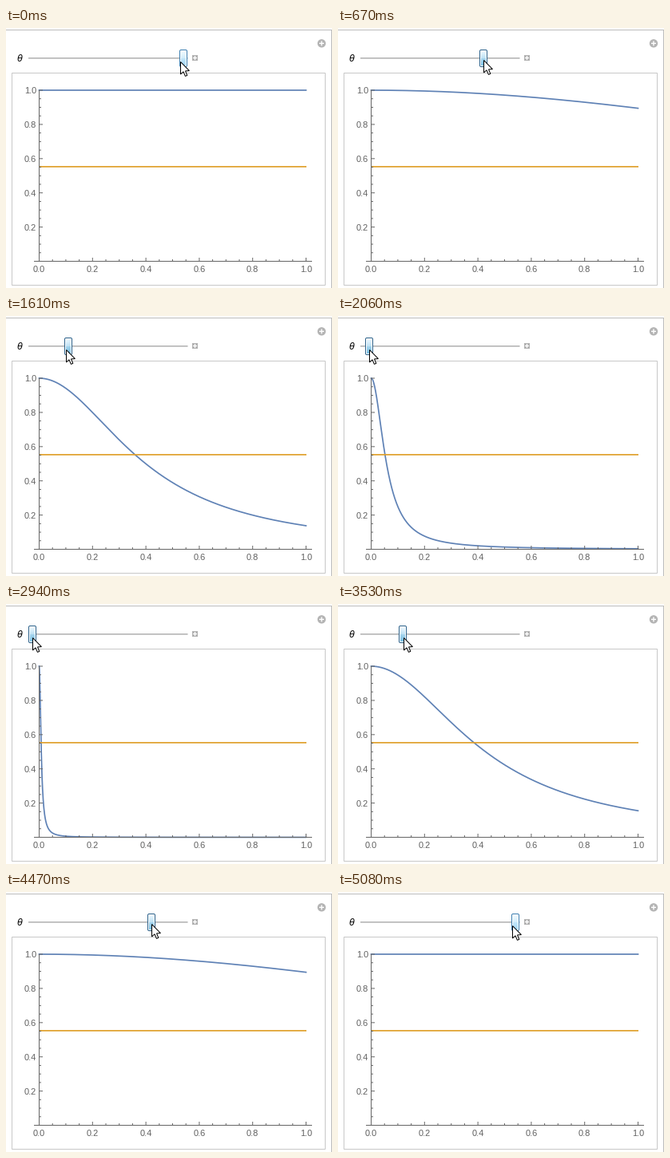
Recreate the animation shown at these times as a matplotlib script. Size 408 by 326 pixels, loop 5.14 s.

```python
import numpy as np
import matplotlib.pyplot as plt
from matplotlib.animation import FuncAnimation
from matplotlib.patches import Circle, FancyBboxPatch, Polygon, Rectangle

plt.rcParams["path.snap"] = False

W, H, DPI = 408, 326, 64
PX = 72 / DPI                     # points per pixel
LOOP, STEP = 5140, 20             # milliseconds
POSE_TIME = LOOP / 70
PRESS, REST, RELEASE = 6, 30, 34  # poses where the drag changes state
BLUE, GOLD, AXIS = "#5e81b5", "#e0a02a", "#666666"
GOLD_LEVEL = 0.553
LEFT, RIGHT = 33, 222             # range of the slider thumb
THETA_MIN, THETA_MAX = 0.008, np.pi / 2

# Key points of the drag: (pose, thumb x) and (pose, pointer x, pointer y).
THUMB = np.array([(5, RIGHT), (15, 122), (21, 81), (22, 78), (29, LEFT)]).T
POINTER = np.array([(0, 218, 42), (2, 222, 38), (5, 222, 38), (15, 122, 42),
                    (22, 75, 42), (29, 33, 42), (30, 30, 42)]).T

fig = plt.figure(figsize=(W / DPI, H / DPI), dpi=DPI, facecolor="white")
ax = fig.add_axes([0, 0, 1, 1])


def px(x):
    return 41.5 + 334 * x


def py(y):
    return 292.5 - 214.5 * y


def line(x0, y0, x1, y1, color, width=1, z=1):
    ax.plot([x0, x1], [y0, y1], color=color, lw=width * PX, zorder=z,
            solid_capstyle="butt")


def label(x, y, text, ha="center", size=11, color="#606060", **style):
    ax.text(x, y, text, ha=ha, va="center_baseline", fontsize=size * PX,
            family="Liberation Sans", color=color, **style)


def plus(x, y, arm):
    line(x - arm, y, x + arm, y, "white", 1.4, 3)
    line(x, y - arm, x, y + arm, "white", 1.4, 3)


def draw_panel():
    line(0, 2.5, W, 2.5, "#bcbcbc")
    line(407.5, 2, 407.5, H, "#bcbcbc")
    ax.add_patch(Rectangle((7.5, 56.5), 392, 266, fill=False,
                           ec="#c8c8c8", lw=PX))
    ax.add_patch(Circle((395, 19.3), 5.2, fc="#b4b4b4", lw=0, zorder=2))
    plus(395, 19.3, 3)
    ax.add_patch(Rectangle((233, 34), 7, 7, fc="#b0b0b0", lw=0, zorder=2))
    plus(236.5, 37.5, 2.5)
    label(16.8, 37.8, "θ", size=12.3, style="italic", color="black")
    line(28, 37.8, 227.5, 37.8, "#b4b4b4", 1.6)


def draw_axes():
    line(35, 292.5, 383, 292.5, AXIS, z=4)
    line(41.5, 78, 41.5, 293, AXIS, z=4)
    for i in range(21):
        v, size = i / 20, 4.5 if i % 4 == 0 else 2.5
        line(px(v), 292.5, px(v), 292.5 - size, AXIS, z=4)
        line(41.5, py(v), 41.5 + size, py(v), AXIS, z=4)
        if i % 4 == 0:
            label(px(v), 301.5, f"{v:.1f}")
            if i:
                label(38, py(v), f"{v:.1f}", ha="right")


def gradient(top, bottom):
    """Glossy vertical ramp with a jump in the middle."""
    mix = np.linspace(0, 0.8, 18)[:, None, None]
    mix[9:] += 0.2
    return (1 - mix) * np.array(top) + mix * np.array(bottom)


HOT = gradient((0.94, 0.98, 1.0), (0.65, 0.85, 0.96))
PRESSED = gradient((0.92, 0.97, 1.0), (0.48, 0.75, 0.89))
ARROW = np.array([(0.5, 0.5), (0.5, 16), (4, 12.8), (6.4, 18.4), (8.8, 17.4),
                  (6.5, 11.9), (11.4, 11.6)])

draw_panel()
draw_axes()
xs = np.linspace(0, 1, 400) ** 2
curve, = ax.plot([], [], color=BLUE, lw=1.7 * PX, zorder=2)
line(px(0), py(GOLD_LEVEL), px(1) + 0.5, py(GOLD_LEVEL), GOLD, 1.7, 3)
thumb_box = FancyBboxPatch((0, 27.5), 9, 21, fc="white", lw=PX, zorder=5,
                           boxstyle="round,pad=0,rounding_size=1.5")
thumb_fill = ax.imshow(HOT, interpolation="nearest", aspect="auto", zorder=6)
cursor = Polygon(ARROW, fc="white", ec="black", lw=PX, zorder=7,
                 joinstyle="miter")
ax.add_patch(thumb_box)
ax.add_patch(cursor)
ax.set(xlim=(0, W), ylim=(H, 0))
ax.axis("off")


def update(n):
    t = n * STEP + 16
    pose = int(min(t, LOOP - t) / POSE_TIME)    # there and back again

    x = np.round(np.interp(pose, *THUMB))
    pressed = PRESS <= pose < RELEASE
    thumb_fill.set_data(PRESSED if pressed else HOT)
    thumb_fill.set_extent((x - 3, x + 3, 47, 29))
    thumb_box.set_x(x - 4.5)
    thumb_box.set_edgecolor("#2c628b" if pressed else "#3c7fb1")
    tip = [np.interp(pose, POINTER[0], track) for track in POINTER[1:]]
    cursor.set_xy(ARROW + np.round(tip))

    share = (x - LEFT) / (RIGHT - LEFT)
    theta = THETA_MIN + share * (THETA_MAX - THETA_MIN)
    s, c = np.sin(theta), np.cos(theta)
    curve.set_data(px(xs), py(s**2 / (s**2 + (xs * c) ** 2)))
    curve.set_visible(pose < REST)              # undefined at angle zero
    return curve, thumb_fill, thumb_box, cursor


anim = FuncAnimation(fig, update, frames=LOOP // STEP, interval=STEP,
                     repeat=True, repeat_delay=0)
plt.show()
```
